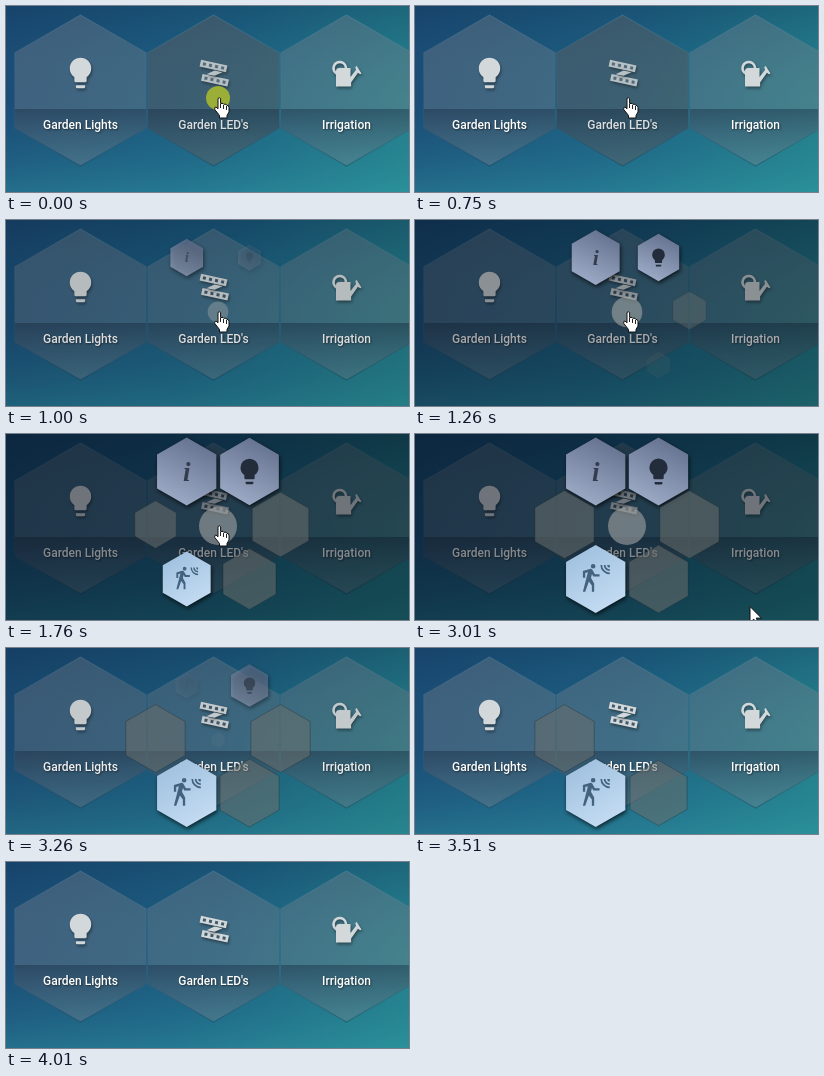
Write an HTML page with a canvas that moves like this. It is 403 px wide and 186 px high and loops after 4510 ms.

```html
<!DOCTYPE html>
<html lang="en">
<head>
<meta charset="utf-8">
<title>Garden menu</title>
<style>
html, body { margin: 0; width: 403px; height: 186px; overflow: hidden; background: #1b5877; }
canvas { display: block; width: 403px; height: 186px; }
</style>
</head>
<body>
<canvas id="stage" width="403" height="186"></canvas>
<script>
const W = 403, H = 186, LOOP = 4510;
const ctx = document.getElementById('stage').getContext('2d');
const clamp = v => Math.max(0, Math.min(1, v));

const bulbPath = new Path2D('M12,2A7,7 0 0,0 5,9C5,11.38 6.19,13.47 8,14.74V17A1,1 0 0,0 9,18H15A1,1 0 0,0 16,17V14.74C17.81,13.47 19,11.38 19,9A7,7 0 0,0 12,2M9,21A1,1 0 0,0 10,22H14A1,1 0 0,0 15,21V20H9V21Z');
const walkPath = new Path2D('M10,.2A1.8,1.8 0 0,0 10,3.8A1.8,1.8 0 0,0 10,.2M15.67,1A7.33,7.33 0 0,0 23,8.33V7A6,6 0 0,1 17,1H15.67M18.33,1C18.33,3.58 20.42,5.67 23,5.67V4.33C21.16,4.33 19.67,2.84 19.67,1H18.33M21,1A2,2 0 0,0 23,3V1H21M7.92,4.03C7.75,4.03 7.58,4.06 7.42,4.11L2,5.8V11H3.8V7.33L5.91,6.67L2,22H3.8L6.67,13.89L9,17V22H10.8V15.59L8.31,11.05L9.04,8.18L10.12,10H15V8.2H11.38L9.38,4.87C9.08,4.37 8.54,4.03 7.92,4.03Z');
const handPath = new Path2D('M4,1.5Q5.3,0 6.6,1.5V6.5L9,6.4L9.8,7.3L12,7.2L12.8,8.3Q15,8.2 15,10.5V15L13,18.5V21H5.5V18.5L.8,12.5Q0,10 2,10L4,11.8Z');
const arrowPath = new Path2D('M0,0V16L3.8,12.6L6.3,18.4L8.8,17.3L6.3,11.6H11.4Z');
const canPath = new Path2D('M-10.5,-2Q-10.5,-5 -7,-5H4V4L9.5,-3L8.8,-6L10.2,-7L15,.5L13.6,1.3L11.4,-.2L4.6,9.5V13.5H-10.5Z');

function place(x, y, scale, draw) {
  ctx.save();
  ctx.translate(x, y);
  ctx.scale(scale, scale);
  draw();
  ctx.restore();
}

function hex(r) {
  const w = r * .872;
  ctx.beginPath();
  ctx.moveTo(0, -r);
  for (const [x, y] of [[w, -.5], [w, .5], [0, 1], [-w, .5], [-w, -.5]]) ctx.lineTo(x, y * r);
  ctx.closePath();
}

function shadow(color, blur, dx, dy) {
  ctx.shadowColor = color;
  ctx.shadowBlur = blur;
  ctx.shadowOffsetX = dx;
  ctx.shadowOffsetY = dy;
}

function ramp(x0, y0, x1, y1, ...colors) {
  const g = ctx.createLinearGradient(x0, y0, x1, y1);
  colors.forEach((c, i) => g.addColorStop(i / (colors.length - 1), c));
  return g;
}

function icon(path, scale, color) {
  ctx.scale(scale, scale);
  ctx.translate(-12, -12);
  ctx.fillStyle = color;
  ctx.fill(path);
}

function ledStrip() {
  const bar = (x, y) => {
    ctx.save();
    ctx.translate(x, y);
    ctx.rotate(.21);
    ctx.fillStyle = '#d3d8da';
    ctx.fillRect(-13.5, -3.5, 27, 7);
    shadow('transparent', 0, 0, 0);
    ctx.fillStyle = '#3f5a6c';
    for (let i = 0; i < 4; i++) ctx.fillRect(-10.8 + i * 6.2, -1.5, 3, 3);
    ctx.restore();
  };
  bar(0, -7);
  bar(1.5, 7.2);
  ctx.fillStyle = '#d3d8da';
  ctx.beginPath();
  ctx.moveTo(-7, 1.2);
  ctx.lineTo(1, -2.4);
  ctx.lineTo(9, -.8);
  ctx.lineTo(1, 2.8);
  ctx.fill();
}

function wateringCan() {
  ctx.strokeStyle = ctx.fillStyle = '#d3d8da';
  ctx.lineWidth = 2.6;
  ctx.beginPath();
  ctx.arc(-6.8, -4.8, 6.2, Math.PI * .6, Math.PI * 2.05);
  ctx.stroke();
  ctx.fill(canPath);
}

const tiles = [
  { x: 74.5, label: 'Garden Lights', draw: () => icon(bulbPath, 1.53, '#d3d8da') },
  { x: 207.5, label: "Garden LED's", draw: ledStrip },
  { x: 340.5, label: 'Irrigation', draw: wateringCan }
];

const slots = [
  { x: 180.7, y: 37.5, close: 3094, kind: 'info' },
  { x: 243.5, y: 37.5, close: 3160, kind: 'bulb' },
  { x: 274.5, y: 90.5, close: 3290 },
  { x: 243.5, y: 145, close: 3500 },
  { x: 180.7, y: 145, close: 3594, kind: 'walk' },
  { x: 149.5, y: 90.5, close: 3660 }
];
slots.forEach((s, i) => s.open = 750 + i * 125);

// Pop in with an ease-out, shrink away linearly.
function pose(t, open, close) {
  const age = (t - open) / 125;
  const gone = clamp((t - close) / 200);
  const rest = 1 - clamp(age / 8);
  return {
    scale: (1 - .8 * rest * rest) * (1 - .75 * gone),
    alpha: clamp((age - .6) * .5) * clamp((1 - gone) * 1.4 - .12)
  };
}

function background() {
  ctx.fillStyle = ramp(0, 30, W, 150, '#1b4c76', '#1d6083', '#25848e');
  ctx.fillRect(0, 0, W, H);
  ctx.fillStyle = ramp(0, 0, 0, H, 'rgba(14,46,78,.28)', 'rgba(30,100,130,0)', 'rgba(52,165,172,.36)');
  ctx.fillRect(0, 0, W, H);
}

function tile({ x, label, draw }, pressed) {
  ctx.save();
  ctx.translate(x, 84.5);
  hex(75.5);
  ctx.fillStyle = pressed ? 'rgba(92,94,98,.5)' : 'rgba(125,130,138,.36)';
  ctx.fill();
  ctx.strokeStyle = ramp(0, -76, 0, 76, 'rgba(140,175,190,.2)', 'rgba(90,130,150,.1)', 'rgba(12,50,75,.35)');
  ctx.lineWidth = 1.2;
  ctx.stroke();
  ctx.save();
  ctx.clip();
  ctx.fillStyle = ramp(0, 18.5, 0, 72, 'rgba(20,40,62,.42)', 'rgba(24,54,80,.2)', 'rgba(24,70,100,0)');
  ctx.fillRect(-66, 18.5, 132, 58);
  ctx.restore();
  ctx.globalAlpha = pressed ? .83 : 1;
  shadow('rgba(0,0,0,.4)', 3, 1, 2);
  place(0, -17.5, 1, draw);
  ctx.font = '500 12px Roboto, Arial, sans-serif';
  ctx.textAlign = 'center';
  ctx.fillStyle = '#fff';
  shadow('rgba(0,0,0,.5)', 2, 1, 1);
  ctx.fillText(label, 0, 38.5);
  ctx.restore();
}

function slot({ x, y, open, close, kind }, t) {
  const { scale, alpha } = pose(t, open, close);
  if (t < open || !alpha) return;
  ctx.save();
  ctx.globalAlpha = alpha;
  place(x, y, scale, () => {
    hex(34);
    if (!kind) {
      ctx.fillStyle = 'rgba(104,110,108,.56)';
      ctx.fill();
      ctx.strokeStyle = 'rgba(20,30,36,.3)';
      ctx.stroke();
      return;
    }
    ctx.fillStyle = kind === 'walk'
      ? ramp(-20, -30, 15, 30, '#9fc0de', '#c4dcf3')
      : ramp(16, -30, -12, 32, '#65728f', '#9dabc7');
    shadow('rgba(0,0,0,.7)', 4, 1, 2);
    ctx.fill();
    shadow('transparent', 0, 0, 0);
    if (kind === 'walk') icon(walkPath, 1.28, '#42627d');
    if (kind === 'bulb') icon(bulbPath, 1.3, '#222c3a');
    if (kind === 'info') {
      ctx.font = 'italic bold 27px "Liberation Serif", "Noto Serif", serif';
      ctx.textAlign = 'center';
      ctx.fillStyle = '#333d4e';
      ctx.fillText('i', 0, 9);
    }
  });
  ctx.restore();
}

function disc(x, y, r, color) {
  ctx.beginPath();
  ctx.arc(x, y, r, 0, Math.PI * 2);
  ctx.fillStyle = color;
  ctx.fill();
}

function cursor(path, x, y) {
  place(x, y, 1, () => {
    ctx.fillStyle = '#fff';
    ctx.strokeStyle = '#111';
    ctx.lineWidth = 1;
    ctx.lineJoin = 'round';
    ctx.fill(path);
    ctx.stroke(path);
  });
}

function hand() {
  cursor(handPath, 208, 91);
  ctx.fillStyle = '#222';
  for (let i = 0; i < 3; i++) ctx.fillRect(214 + i * 3, 98 + i, 1, 4);
}

function render(t) {
  background();
  tiles.forEach((s, i) => tile(s, t < 1000 && i === 1));

  const dim = .48 * Math.min(clamp((t - 830) / 600), clamp((3290 - t) / 200));
  ctx.fillStyle = `rgba(0,8,16,${dim})`;
  ctx.fillRect(0, 0, W, H);

  if (t < 750) disc(212, 92, 12, '#9bae38');
  if (t >= 1000) {
    const { scale, alpha } = pose(t, 750, 3094);
    disc(212, 92, 19 * scale, `rgba(165,168,166,${.58 * alpha})`);
  }
  slots.forEach(s => slot(s, t));

  if (t < 2510) hand();
  else if (t < 2760) cursor(arrowPath, 342, 173.5);
  else if (t >= 3010 && t < 3260) cursor(arrowPath, 335, 172.5);
}

// The picture advances in quarter-second steps, with one slightly longer.
function step(t) {
  if (t < 1260) return Math.min(1000, Math.floor(t / 250) * 250);
  return Math.min(4010, 1260 + Math.floor((t - 1260) / 250) * 250);
}

const start = performance.now();
function tick() {
  render(step((performance.now() - start) % LOOP));
  requestAnimationFrame(tick);
}
tick();
</script>
</body>
</html>
```
